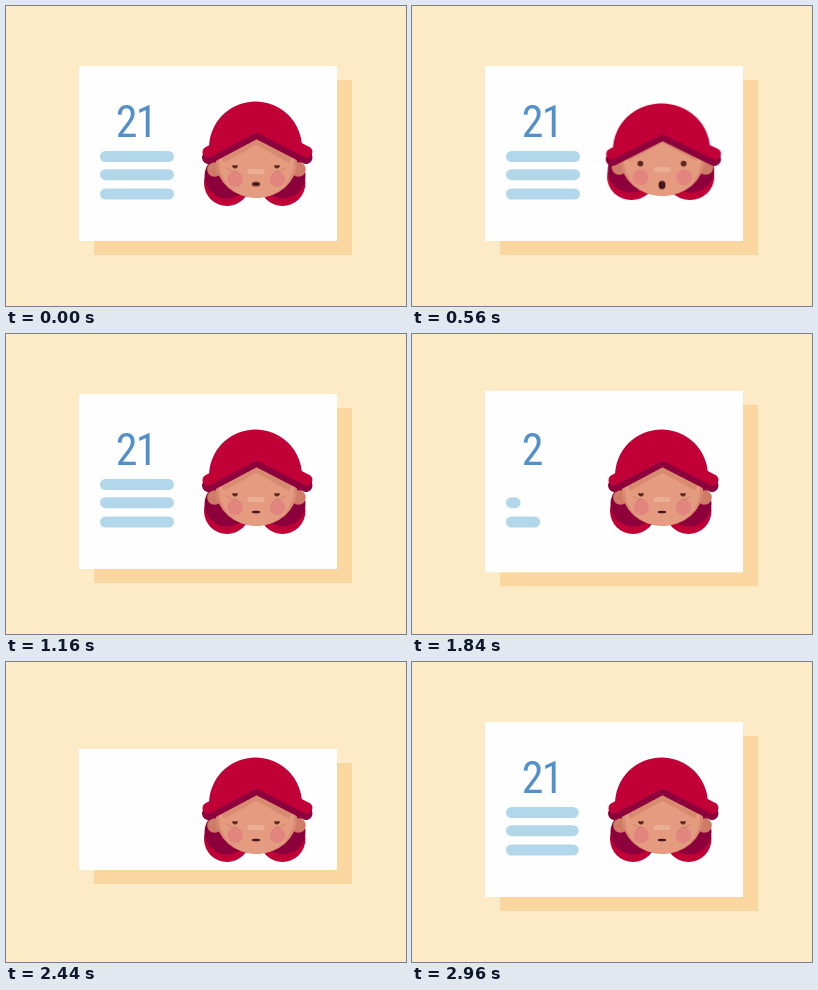
Write an HTML page that moves like this. It is 400 px wide and 300 px high and loops after 3 s.

```html
<!DOCTYPE html>
<html lang="en">
<head>
<meta charset="utf-8">
<title>Profile card</title>
<style>
  :root {
    --back: #fdeac6; --shadow: #fad6a1; --blue: #5390ca; --bar: #b3d7ea;
    --red: #c00037; --wine: #8c003c; --skin: #e59b80; --shade: #d88b71; --ear: #cf7b68;
    --swift: cubic-bezier(.65, 0, .35, 1);
    --soft: cubic-bezier(.45, 0, .55, 1);
  }
  html, body { margin: 0; width: 100%; height: 100%; overflow: hidden; background: var(--back); }
  .stage { position: relative; width: 400px; height: 300px; overflow: hidden; }

  /* Taller than the card at rest, so the clip can overshoot. */
  .card {
    position: absolute; left: 73px; top: 50px; width: 258px; height: 195px;
    background: #fffefe; animation: card 3s var(--swift) infinite;
  }
  .card.under { left: 88px; top: 64px; background: var(--shadow); }
  svg { display: block; width: 258px; height: 195px; }

  @keyframes card {
    0%, 50.4%    { clip-path: inset(10px 0) }
    59.2%        { clip-path: inset(3px 0) }
    70.2%, 75.3% { clip-path: inset(98px 0) }
    86.3%        { clip-path: inset(3px 0) }
    95%, 100%    { clip-path: inset(10px 0) }
  }

  .digits { font: 44px "Liberation Sans Narrow", "Roboto Condensed", Roboto, sans-serif; font-stretch: condensed; fill: var(--blue); text-anchor: middle; }
  .two { animation: two 3s step-end infinite; }
  .one { animation: one 3s step-end infinite; }
  @keyframes two { 0% { opacity: 1 } 62.6% { opacity: 0 } 91.9% { opacity: 1 } }
  @keyframes one { 0% { opacity: 1 } 57.9% { opacity: 0 } 95.9% { opacity: 1 } }

  /* The bars finish growing just after the loop restarts. */
  .bars path {
    stroke: var(--bar); stroke-width: 11; stroke-linecap: round;
    stroke-dasharray: 63 200; animation: 3s var(--swift) -2.9s infinite;
  }
  .bars path:nth-child(1) { animation-name: bar1; }
  .bars path:nth-child(2) { animation-name: bar2; }
  .bars path:nth-child(3) { animation-name: bar3; }
  @keyframes bar1 {
    0%, 45.67%, 97%, 100% { stroke-dashoffset: 0 }
    58.6%, 86% { stroke-dashoffset: 64 }
  }
  @keyframes bar2 {
    0%, 48.33%, 97%, 100% { stroke-dashoffset: 0 }
    61.27%, 86% { stroke-dashoffset: 64 }
  }
  @keyframes bar3 {
    0%, 51%, 97%, 100% { stroke-dashoffset: 0 }
    63.93%, 86% { stroke-dashoffset: 64 }
  }

  .hat, .face, .tails, .lid, .bag, .mouth { animation: 3s var(--soft) infinite; }
  .hat, .face, .tails { transform-origin: 250px 150px; }
  .hat { animation-name: hat; }
  .face { animation-name: face; }
  .tails { animation-name: tails; }
  .lid { animation-name: lid; transform-origin: 0 154px; }
  .bag { animation-name: bag; }
  .mouth { animation-name: mouth; transform-origin: 250px 178px; }

  @keyframes hat {
    0%, 38.67%, 100% { transform: none }
    4%     { transform: translateY(3px) scaleX(1.03) }
    10%    { transform: translateY(-17px) scaleX(.97) }
    19.33% { transform: translateY(2px) scaleX(1.045) }
    28.67% { transform: translateY(-1px) scaleX(.99) }
  }
  @keyframes face {
    0%, 37.33%, 100% { transform: none }
    4%     { transform: translateY(2px) scaleX(1.02) }
    10.67% { transform: translateY(-14px) scaleX(.98) }
    18.67% { transform: translateY(-2px) scaleX(1.03) }
    23.33% { transform: translateY(2px) scaleX(1.01) }
    28.67% { transform: translateY(-1px) scaleX(.99) }
  }
  @keyframes tails {
    0%, 37.33%, 100% { transform: none }
    4.67%  { transform: translateY(2px) scaleX(1.02) }
    12%    { transform: translateY(-14px) scaleX(.98) }
    18.67% { transform: translateY(-6px) scaleX(1.055) }
    24.67% { transform: translateY(5px) scaleX(.99) }
    30.67% { transform: translateY(-1px) }
  }
  @keyframes lid {
    0%, 28.67%, 100% { transform: none }
    6.67%, 21.33% { transform: scaleY(0) }
  }
  @keyframes bag {
    0%, 28.67%, 100% { opacity: 1 }
    6.67%, 21.33% { opacity: 0 }
  }
  @keyframes mouth {
    0% { transform: scale(.95, 1.7) }
    5.33%, 20% { transform: translateY(3px) scale(.78, 3.2) }
    28%, 98.7% { transform: none }
    100% { transform: scale(.95, 1.7) }
  }
</style>
</head>
<body>
<div class="stage">
  <div class="card under"></div>
  <div class="card">
    <svg viewBox="73 50 258 195" fill="none">
      <g class="digits">
        <text class="two" x="120.5" y="130.5">2</text>
        <text class="one" x="140.5" y="130.5">1</text>
      </g>
      <g class="bars">
        <path d="M99.5 150.5h63"/>
        <path d="M99.5 168.7h63"/>
        <path d="M99.5 188h63"/>
      </g>

      <g class="tails">
        <g fill="var(--red)">
          <circle cx="221" cy="177" r="23"/>
          <circle cx="276.5" cy="177" r="23"/>
        </g>
        <g fill="var(--wine)">
          <circle cx="221" cy="170" r="22.5"/>
          <circle cx="277" cy="170" r="22.5"/>
        </g>
      </g>

      <g class="face">
        <g fill="var(--ear)">
          <circle cx="208.5" cy="163.5" r="7.3"/>
          <circle cx="292.5" cy="163.5" r="7.3"/>
        </g>
        <ellipse cx="250.5" cy="156" rx="40.5" ry="36" fill="var(--shade)"/>
        <ellipse cx="250.5" cy="156" rx="37.5" ry="36" fill="var(--skin)"/>
        <path d="M215 151.500L250.500 132L286 151.500" stroke="var(--shade)" stroke-width="12"/>
        <g fill="#e2857f">
          <circle cx="229.2" cy="173.3" r="7.7"/>
          <circle cx="271.5" cy="173.3" r="7.7"/>
        </g>
        <rect x="241.5" y="163" width="17" height="5" rx="2.5" fill="#ebaf93"/>
        <g fill="#59271f">
          <circle cx="229" cy="159.6" r="2.8"/>
          <circle cx="271" cy="159.6" r="2.8"/>
        </g>
        <path class="lid" d="M225 154h8v5.2h-8zM267 154h8v5.2h-8z" fill="var(--skin)"/>
        <path class="bag" d="M221 162q4 4.500 10 3.500M279 162q-4 4.500-10 3.500" stroke="#cb7d68"/>
        <ellipse class="mouth" cx="250" cy="178" rx="4.300" ry="1.300" fill="#45171d"/>
      </g>

      <g class="hat">
        <path d="M202.500 151.500L250.500 126L300 151.500" stroke="var(--wine)" stroke-width="13" stroke-linecap="round"/>
        <path d="M203 147V142A46.500 46.500 0 0 1 296 142V147L250.500 122Z" fill="var(--red)"/>
        <path d="M202 146L250.500 120.300L301 146" stroke="var(--red)" stroke-width="11" stroke-linecap="round"/>
      </g>
    </svg>
  </div>
</div>
</body>
</html>
```
